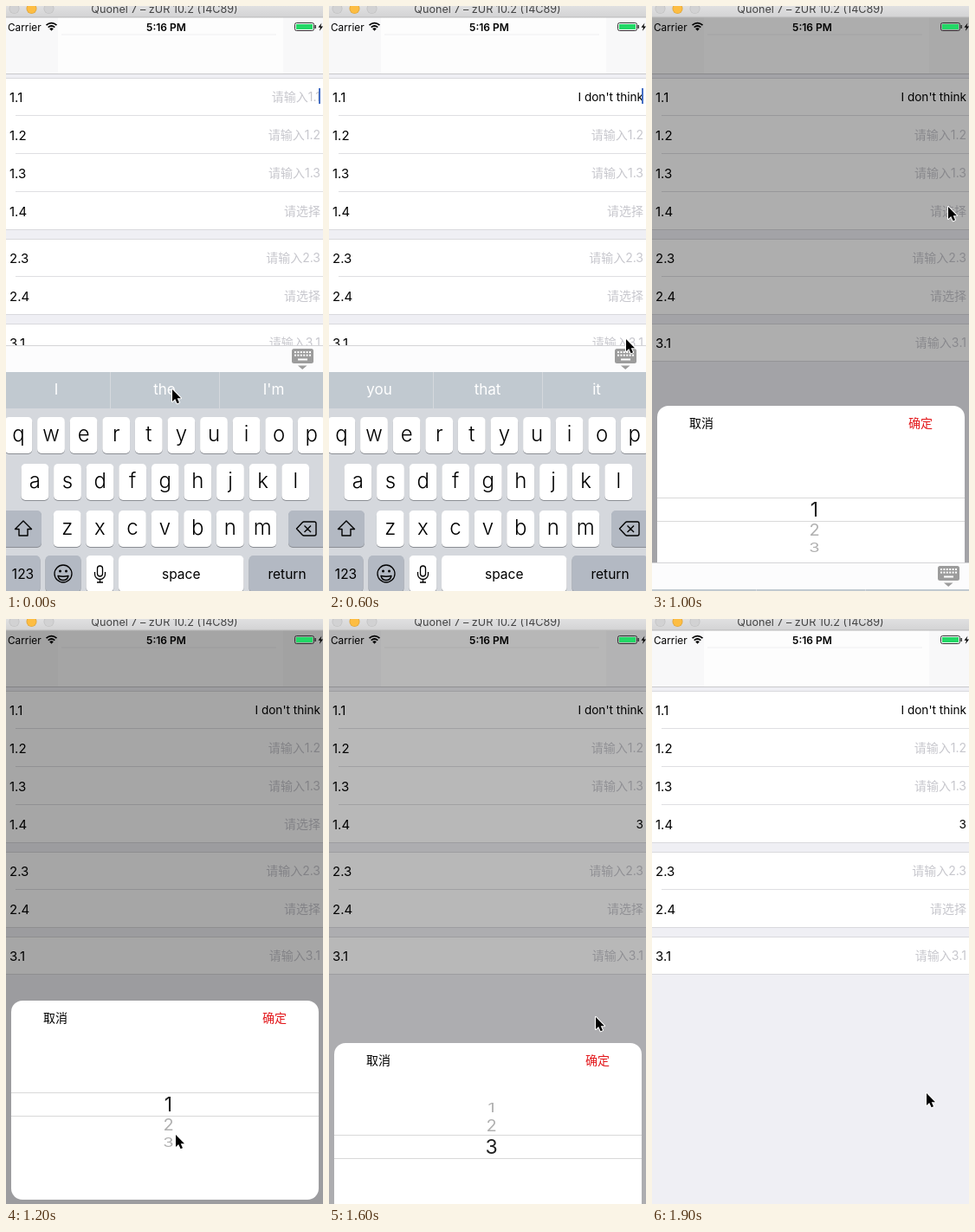
Write an HTML page with a canvas that moves like this. It is 366 px wide and 676 px high and loops after 2 s.

```html
<!DOCTYPE html>
<html lang="zh">
<head>
<meta charset="utf-8">
<style>
  html, body { margin: 0; width: 100%; height: 100%; overflow: hidden; }
  canvas { display: block; }
</style>
</head>
<body>
<canvas id="stage" width="366" height="676"></canvas>
<script>
const W = 366, H = 676, LOOP = 2000, STEP = 100;
const ctx = document.getElementById('stage').getContext('2d');
const FONT = 'Inter, "Noto Sans CJK SC", "Noto Sans CJK", sans-serif';

// Tracks are [step, ...values]; one step lasts 100 ms.
const POINTER = [
  [0, 192, 443], [1, 75, 441], [2, 62, 440], [3, 190, 438], [4, 342, 430], [5, 342, 430],
  [6, 343, 385], [7, 343, 285], [8, 342, 232], [10, 342, 232], [11, 262, 430],
  [12, 196, 596], [13, 198, 555], [14, 250, 500], [15, 309, 457], [16, 308, 460],
  [17, 313, 515], [18, 317, 546], [19, 317, 548]
];
const SHEET = [[9, 0], [10, 0.91], [11, 1], [15, 1], [16, 0.79], [17, 0.2], [18, 0]];
const WHEEL = [[12, 0], [13, 1.1], [14, 2]];
const KEYBOARD_DROP = [[9, 0], [10, 251], [11, 290]];
const TYPING = [
  [0, '', ['I', 'the', "I'm"]],
  [2, 'I', ['am', "don't", 'have']],
  [4, "I don't", ['know', 'want', 'think']],
  [5, "I don't think", ['you', 'that', 'it']]
];

function at(track, step) {
  const next = track.findIndex(p => p[0] > step);
  if (next === 0) return track[0].slice(1);
  if (next < 0) return track[track.length - 1].slice(1);
  const a = track[next - 1], b = track[next], k = (step - a[0]) / (b[0] - a[0]);
  return a.slice(1).map((v, i) => v + (b[i + 1] - v) * k);
}

function rect(x, y, w, h, color) {
  ctx.fillStyle = color;
  ctx.fillRect(x, y, w, h);
}

function round(x, y, w, h, r, color) {
  ctx.beginPath();
  ctx.roundRect(x, y, w, h, r);
  ctx.fillStyle = color;
  ctx.fill();
}

function disc(x, y, r, color) {
  ctx.beginPath();
  ctx.arc(x, y, r, 0, Math.PI * 2);
  ctx.fillStyle = color;
  ctx.fill();
}

function text(str, x, baseline, size, color = '#000', align = 'left', weight = 400) {
  ctx.font = `${weight} ${size}px ${FONT}`;
  ctx.textAlign = align;
  ctx.fillStyle = color;
  ctx.fillText(str, x, baseline);
}

function stroke(path, width = 1.4, color = '#000') {
  ctx.strokeStyle = color;
  ctx.lineWidth = width;
  ctx.lineJoin = 'round';
  ctx.stroke(new Path2D(path));
}

function fill(path, color = '#000') {
  ctx.fillStyle = color;
  ctx.fill(new Path2D(path));
}

function drawSection(top, rows) {
  const height = rows.length * 44;
  rect(0, top, W, height, '#fff');
  rect(0, top, W, 1, '#d9d9dd');
  rect(0, top + height - 1, W, 1, '#d9d9dd');
  rows.forEach(([label, hint, value], i) => {
    const y = top + i * 44;
    if (i) rect(11, y - 1, W - 11, 1, '#dfdfe2');
    text(label, 4, y + 27.5, 15);
    text(value || hint, 363, y + 26.5, value ? 13.6 : 14, value ? '#000' : '#c7c7cd', 'right');
  });
}

function drawPage(step, typed) {
  rect(0, 0, W, H, '#efeff4');
  rect(0, 13, W, 65, '#f8f8f9');
  rect(60, 13, 260, 65, '#fdfdfd');
  rect(64, 32, 248, 2, '#f6f6f7');
  rect(0, 78, W, 1, '#c9c9cc');
  drawSection(83, [
    ['1.1', '请输入1.1', typed], ['1.2', '请输入1.2'],
    ['1.3', '请输入1.3'], ['1.4', '请选择', step >= 16 ? '3' : '']
  ]);
  drawSection(269, [['2.3', '请输入2.3'], ['2.4', '请选择']]);
  drawSection(367, [['3.1', '请输入3.1']]);
  if (step < 10) rect(361, 95, 2, 18, '#466fc4');
}

function drawSheet(shown, selected) {
  const top = Math.round(676 - 235 * shown);
  ctx.save();
  ctx.beginPath();
  ctx.roundRect(6, top, 355, 230, 13);
  ctx.clip();
  rect(6, top, 355, 230, '#fff');
  text('取消', 43, top + 25, 14);
  text('确定', 324, top + 25, 14, '#e3171b', 'right');
  rect(6, top + 106, 355, 1, '#d9d9d9');
  rect(6, top + 133, 355, 1, '#d9d9d9');
  for (let n = 0; n < 3; n++) {
    const offset = n - selected, angle = offset * 0.4;
    const active = Math.abs(offset) < 0.5;
    ctx.save();
    ctx.translate(187.5, top + 119.5 + 62 * Math.sin(angle));
    ctx.scale(1, Math.cos(angle));
    const size = active ? 23 : 20;
    text(String(n + 1), 0, size * 0.36, size, active ? '#222' : '#b0b0b0', 'center');
    ctx.restore();
  }
  ctx.restore();
}

function drawKey(x, y, w, label = '', size = 24, color = '#fff') {
  round(x, y + 1, w, 42, 5, '#8b8e94');
  round(x, y, w, 42, 5, color);
  const baseline = size > 20 ? y + 28 : y + 26.5;
  text(label, x + w / 2, baseline, size, '#000', 'center', size > 20 ? 300 : 400);
}

function drawHideIcon() {
  round(330, 396, 25, 17, 2.5, '#9c9c9c');
  for (let row = 0; row < 2; row++)
    for (let i = 0; i < 6; i++) rect(333 + i * 3.4, 399 + row * 3.6, 2, 2, '#fff');
  rect(337, 407.5, 11, 2, '#fff');
  fill('M337 415.5H347.5L342.2 420Z', '#9c9c9c');
}

function drawKeyboard(drop, words, pressed) {
  const GREY = '#b3b9c3';
  ctx.save();
  ctx.translate(0, drop);
  rect(0, 392, W, 31, '#fcfcfd');
  rect(0, 392, W, 1, '#d4d4d7');
  drawHideIcon();
  rect(0, 423, W, 253, '#d5d8dd');
  [[0, 120, 58], [121, 125, 183], [247, 119, 309]].forEach(([x, w, mid], i) => {
    const down = i === pressed;
    rect(x, 423, w, 42, down ? '#ececed' : '#c1c9d0');
    text(words[i], mid, 448.5, 17, down ? '#000' : '#fff', 'center');
  });

  [['qwertyuiop', -1.5, 475], ['asdfghjkl', 17.5, 529], ['zxcvbnm', 54.8, 583]]
    .forEach(([letters, x, y]) =>
      [...letters].forEach((c, i) => drawKey(x + i * 37.6, y, 31.8, c)));

  drawKey(-4, 583, 45, '', 16, GREY);
  stroke('M20 595L29.5 604.5H25V612H15V604.5H10.5Z');
  drawKey(326, 583, 46, '', 16, GREY);
  stroke('M335.5 604L342 597Q343 596 344 596H356Q358 596 358 598V610Q358 612 356 612H344Q343 612 342 611ZM344.5 600.5L352 608M352 600.5L344.5 608');

  drawKey(-4, 635, 43.5, '', 16, GREY);
  text('123', 19.5, 661.5, 15.5, '#000', 'center');
  drawKey(45.5, 635, 41, '', 16, GREY);
  stroke('M56 656a10 10 0 1 0 20 0a10 10 0 1 0 -20 0M60 658.5Q66 660 72 658.5Q71 663.5 66 663.5Q61 663.5 60 658.5Z', 1.3);
  disc(62.5, 653, 1.5, '#000');
  disc(69.5, 653, 1.5, '#000');
  drawKey(92.5, 635, 31.8);
  stroke('M105.5 650a3 3 0 0 1 6 0v6a3 3 0 0 1 -6 0ZM102.5 654v2.5a6 6 0 0 0 12 0V654M108.5 662.5V666M105 666H112', 1.3);
  drawKey(130, 635, 144.5, 'space', 15.5);
  drawKey(280.5, 635, 88, 'return', 15.5, GREY);
  ctx.restore();
}

function drawStatus() {
  text('Carrier', 2, 28.5, 11.8);
  stroke('M46.5 22.2Q52.5 17 58.5 22.2M48.7 24.7Q52.5 21.3 56.3 24.7', 1.7);
  fill('M50.2 26.2Q52.5 24.4 54.8 26.2L52.5 28.8Z');
  text('5:16 PM', 185, 28.5, 12, '#000', 'center', 600);
  ctx.beginPath();
  ctx.roundRect(333.5, 19.5, 22, 9, 2);
  ctx.strokeStyle = '#333';
  ctx.lineWidth = 1;
  ctx.stroke();
  rect(335, 21, 19, 6, '#22d866');
  rect(356.5, 22, 1.5, 4, '#333');
  fill('M364.5 19.5L360.5 24.7H363L361.8 29L366 23.4H363.3Z');
}

function drawTitleBar() {
  const shade = ctx.createLinearGradient(0, 0, 0, 13);
  shade.addColorStop(0, '#e0e0e1');
  shade.addColorStop(1, '#d3d3d4');
  rect(0, 0, W, 13, shade);
  rect(0, 12.5, W, 1, '#b9b9ba');
  [['#c2c2c3', '#d2d2d3'], ['#dfa53a', '#fdbd42'], ['#c2c2c3', '#d2d2d3']].forEach(([edge, face], i) => {
    disc(9.5 + i * 20, 3, 6, edge);
    disc(9.5 + i * 20, 3, 5.2, face);
  });
  text('Quonel 7 – zUR 10.2 (14C89)', 183, 8, 12.6, '#444', 'center');
}

function drawPointer([x, y]) {
  const arrow = 'M0 0V14L3.2 11L5.6 16.3L8 15.2L5.7 10.2H10Z';
  ctx.save();
  ctx.translate(x, y);
  stroke(arrow, 2, '#fff');
  fill(arrow);
  ctx.restore();
}

function draw(step) {
  const [, typed, words] = TYPING.filter(entry => entry[0] <= step).pop();
  const [shown] = at(SHEET, step);
  drawPage(step, typed);
  rect(0, 13, W, H - 13, `rgba(0, 0, 0, ${0.35 * shown})`);
  if (shown) drawSheet(shown, at(WHEEL, step)[0]);
  if (step < 11) drawKeyboard(at(KEYBOARD_DROP, step)[0], words, step === 4 ? 2 : -1);
  drawStatus();
  drawTitleBar();
  drawPointer(at(POINTER, step));
}

const start = performance.now();
function tick() {
  const time = (performance.now() - start) % LOOP;
  draw(Math.floor(time / STEP));
  requestAnimationFrame(tick);
}
tick();
</script>
</body>
</html>
```
